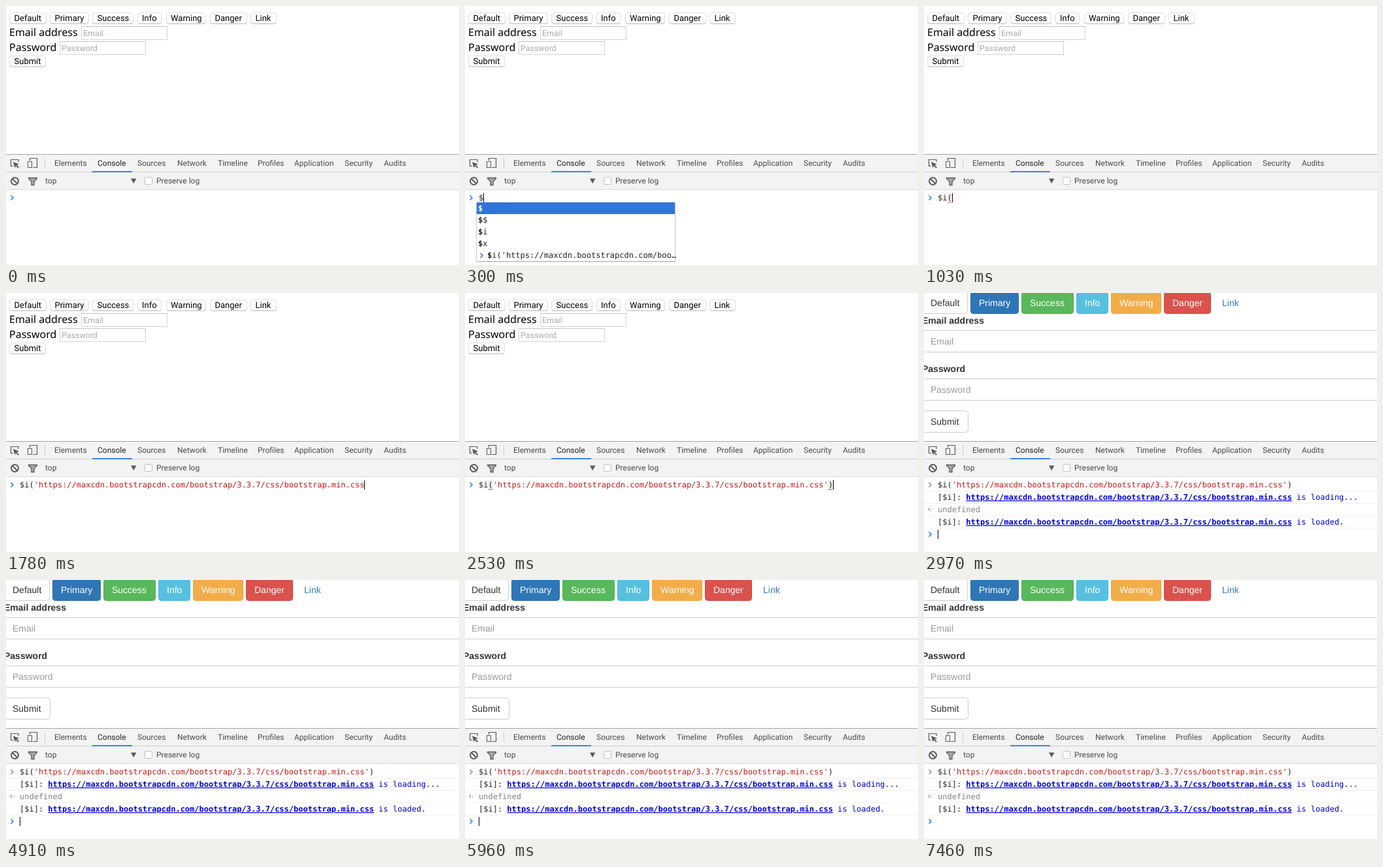
Write an HTML page that moves like this. It is 693 px wide and 397 px high and loops after 7560 ms.

```html
<!DOCTYPE html>
<html lang="en">
<head>
<meta charset="utf-8">
<title>Console import</title>
<style>
  html, body { margin: 0; width: 100%; height: 100%; overflow: hidden; background: #fff; }
  svg { display: block; width: 693px; height: 397px; }
  text { white-space: pre; text-rendering: geometricPrecision; }
  .ui { font: 12px Roboto, sans-serif; fill: #4a4a4a; }
  .native { font: 13px Roboto, sans-serif; fill: #000; }
  .hint { font: 12.4px Roboto, sans-serif; fill: #a9a9a9; }
  .plain { font: 16px "Noto Sans", sans-serif; fill: #000; }
  .boot { font: 14px "Liberation Sans", Arial, sans-serif; fill: #333; }
  .mono { font: 12px "DejaVu Sans Mono", monospace; fill: #222; }
  .b { font-weight: bold; }
</style>
</head>
<body>
<svg id="stage" viewBox="0 0 693 397">
  <g id="page"></g>
  <g id="tools"></g>
  <g id="console"></g>
</svg>
<script>
const LOOP = 7560;
const CHAR = 7.224;
const LEFT = 21;
const URL_TEXT = 'https://maxcdn.bootstrapcdn.com/bootstrap/3.3.7/css/bootstrap.min.css';
const COMMAND = `$i('${URL_TEXT}')`;
const RED = '#c41a16';
const BLUE = '#3879d9';

const $ = id => document.getElementById(id);
const text = (x, y, str, cls, attrs = '') =>
  `<text x="${x}" y="${y}" class="${cls}" ${attrs}>${str}</text>`;
const rect = (x, y, w, h, fill, attrs = '') =>
  `<rect x="${x}" y="${y}" width="${w}" height="${h}" fill="${fill}" ${attrs}/>`;
const path = (d, stroke, width = 1.5, attrs = '') =>
  `<path d="${d}" fill="none" stroke="${stroke}" stroke-width="${width}" ${attrs}/>`;
const frame = (x, y, w, h, fill, stroke, r = 0) =>
  rect(x + .5, y + .5, w - 1, h - 1, fill, `stroke="${stroke}" rx="${r}"`);
const span = (str, fill, attrs = '') => `<tspan fill="${fill}" ${attrs}>${str}</tspan>`;

// Page before the stylesheet arrives
function plainPage() {
  const button = (x, y, w, label, tx) =>
    rect(x + .5, y + 1.2, w - 1, 16.6, '#c4c4c4', 'rx="3.5"') +
    frame(x, y, w, 17, '#fff', '#dedede', 3.5) + text(tx, y + 13, label, 'native');
  const field = (x, y, label) =>
    frame(x, y, 132, 21, '#fff', '#d4d4d4') +
    rect(x, y, 132, 1, '#c3c3c3') + text(x + 3, y + 15, label, 'hint');
  return [
    [5, 57, 'Default', 12.5], [67, 60, 'Primary', 74.5], [132, 63, 'Success', 139.5],
    [201, 37, 'Info', 208], [245, 61, 'Warning', 252], [312, 57, 'Danger', 319.5],
    [374, 40, 'Link', 381.5]
  ].map(([x, w, label, tx]) => button(x, 10, w, label, tx)).join('') +
    text(5, 46, 'Email address', 'plain') + field(115, 31, 'Email') +
    text(5, 69, 'Password', 'plain') + field(82, 54, 'Password') +
    button(5, 76, 56, 'Submit', 12.5);
}

// Page with the stylesheet; field borders fade in shortly after
function styledPage(border) {
  const button = (x, y, w, label, fill, edge, ink) =>
    frame(x, y, w, 34, fill, edge, 4) + text(x + 13, y + 22, label, 'boot', `style="fill:${ink}"`);
  const field = (y, label) =>
    frame(-3, y, 720, 34, '#fff', border, 4) + text(10, y + 22, label, 'boot', 'style="fill:#999"');
  return [
    [-3, 70, 'Default', '#fff', '#ccc', '#333'],
    [71, 74, 'Primary', '#2f76b7', '#2a69a5', '#fff'],
    [149, 80, 'Success', '#58b85b', '#48ae4b', '#fff'],
    [233, 49, 'Info', '#57c0df', '#43b8db', '#fff'],
    [286, 77, 'Warning', '#f2ad4a', '#f0a232', '#fff'],
    [367, 72, 'Danger', '#db524d', '#d63e38', '#fff'],
    [443, 52, 'Link', 'none', 'none', '#337ab7']
  ].map(([x, w, ...rest]) => button(x, -2, w, ...rest)).join('') +
    text(-3, 47, 'Email address', 'boot b') + field(57, 'Email') +
    text(-3, 121, 'Password', 'boot b') + field(131, 'Password') +
    button(-3, 180, 71, 'Submit', '#fff', '#ccc', '#333');
}

function toolbars() {
  const ink = '#5a5a5a';
  const tabs = [
    [74, 'Elements'], [140, 'Console'], [201, 'Sources'], [262, 'Network'], [324, 'Timeline'],
    [385, 'Profiles'], [441, 'Application'], [518, 'Security'], [578, 'Audits']
  ];
  return rect(0, 227, 693, 170, '#fff') + rect(0, 228, 693, 54, '#f3f3f3') +
    rect(0, 227, 693, 1, '#a3a3a3') + rect(0, 254, 693, 1, '#ccc') + rect(0, 281, 693, 1, '#dadada') +
    rect(132, 253, 61, 2, '#3b82f0') +
    tabs.map(([x, name]) =>
      text(x, 245, name, 'ui', name === 'Console' ? 'style="fill:#222"' : '')).join('') +
    // inspect and device icons
    path('M11 245.500H7.500V235.500H19V239', ink, 1.2) +
    `<path d="M11 239l9 3.500-3.500 1.500 3.500 3.500-1.500 1.300-3.500-3.500-1.500 3z" fill="${ink}"/>` +
    path('M36.500 237V233.500H47.500V247.500H41', ink, 1.2) + frame(33, 238, 7, 10, '#f3f3f3', ink) +
    rect(59, 233, 1, 16, '#ccc') +
    // clear and filter icons
    `<circle cx="13.500" cy="268.500" r="5.500" fill="none" stroke="${ink}" stroke-width="2"/>` +
    path('M9.500 264.500L17.500 272.500', ink, 2) +
    `<path d="M34.500 263.500H47.500V264.500L43 269V274.500H39V269L34.500 264.500Z" fill="#aaa" stroke="${ink}" stroke-width="1.3"/>` +
    text(60, 272, 'top', 'ui') + `<path d="M191 264.500H199.500L195.200 272Z" fill="${ink}"/>` +
    frame(212, 262, 12, 12, '#fff', '#bdbdbd', 2) + text(230, 272, 'Preserve log', 'ui');
}

const chevron = (x, y, color) => path(`M${x} ${y - 3.5}l3.500 3.500l-3.500 3.500`, color, 1.6);
const caret = (n, y) => rect(Math.round(LEFT + n * CHAR), y, 1, 14, '#000');

// Command typed up to n characters, with an optional grey completion
function command(n, ghost) {
  return text(LEFT, 298, span(COMMAND.slice(0, Math.min(n, 3)), '#222') +
    span(COMMAND.slice(3, Math.min(n, 74)), RED) + span(COMMAND.slice(74, n), '#222') +
    (ghost ? span(COMMAND.slice(n), '#a0a0a0') : ''), 'mono');
}

function bracket(i, rgb) {
  const x = LEFT + i * CHAR;
  return rect(x, 287, CHAR, 14, `rgba(${rgb},.07)`) + rect(x, 301, CHAR, 1, `rgba(${rgb},.5)`);
}

function popup(words, prefix) {
  const h = (words.length + 1) * 18;
  const entry = (x, i, word, ink) => text(x, 314 + i * 18,
    span(prefix, ink, 'class="b"') + span(word.slice(prefix.length), ink), 'mono');
  return rect(16.5, 301, 306, h + 2, 'rgba(0,0,0,.08)', 'rx="2"') +
    rect(17.5, 301, 304, h + 1, 'rgba(0,0,0,.25)') +
    rect(18, 301, 303, h, '#fff') + rect(18, 301, 303, 18, '#3374db') +
    words.map((word, i) => entry(20, i, word, i ? '#222' : '#fff')).join('') +
    chevron(23.5, 310.5 + words.length * 18, BLUE) +
    entry(34, words.length, COMMAND.slice(0, 39) + '…', '#222');
}

function logLine(y, tail) {
  return text(LEFT, y, span('[$i]: ', '#222') +
    span(URL_TEXT, '#0000e6', 'class="b" text-decoration="underline"') + span(tail, '#0000e6'), 'mono');
}

function prompt(y, inner) {
  return chevron(7.5, y, '#2f7df6') + inner;
}

function entered() {
  return chevron(7.5, 294, '#909090') + command(75) + rect(0, 303, 693, 1, '#f0f0f0');
}

function finished(caretOn) {
  return entered() + logLine(317, ' is loading...') + logLine(355, ' is loaded.') +
    [322, 341, 360].map(y => rect(0, y, 693, 1, '#f0f0f0')).join('') +
    path('M9 329l-2.500 2.500l2.500 2.500', '#a0a0a0', 1.2) + rect(11, 331, 1.5, 1.5, '#a0a0a0') +
    text(LEFT, 336, 'undefined', 'mono', 'style="fill:#808080"') +
    prompt(370, caretOn ? caret(0, 363) : '');
}

const typed = (n, ghost = false, extra = '') =>
  prompt(294, extra + command(n, ghost) + caret(n, 287));

const plain = plainPage();
const styled = styledPage('#ccc');
const states = [
  [0, plain, prompt(294, '')],
  [300, plain, typed(1) + popup(['$', '$$', '$i', '$x'], '$')],
  [590, plain, typed(2) + popup(['$', '$$', '$i', '$x'], '$')],
  [740, plain, typed(2) + popup(['$i'], '$i')],
  [1030, plain, typed(3, false, bracket(2, '255,0,0'))],
  [1330, plain, typed(4, true)],
  [1780, plain, typed(73)],
  [2080, plain, typed(74, true)],
  [2530, plain, typed(75, false, bracket(2, '0,0,0') + bracket(74, '0,0,0'))],
  [2820, styledPage('#aaa'), entered() + prompt(313, caret(0, 306))]
];
[2970, 3420, 3860, 4460, 4910, 5510, 5960, 6560, 7010, 7460]
  .forEach((at, i) => states.push([at, styled, finished(i % 2 === 0)]));

let shown;
function render(t) {
  const state = states.filter(([at]) => at <= t).pop();
  if (state === shown) return;
  shown = state;
  $('page').innerHTML = state[1];
  $('console').innerHTML = state[2];
}

$('tools').innerHTML = toolbars();
render(0);
const start = performance.now();
function tick() {
  render((performance.now() - start) % LOOP);
  requestAnimationFrame(tick);
}
requestAnimationFrame(tick);
</script>
</body>
</html>
```
